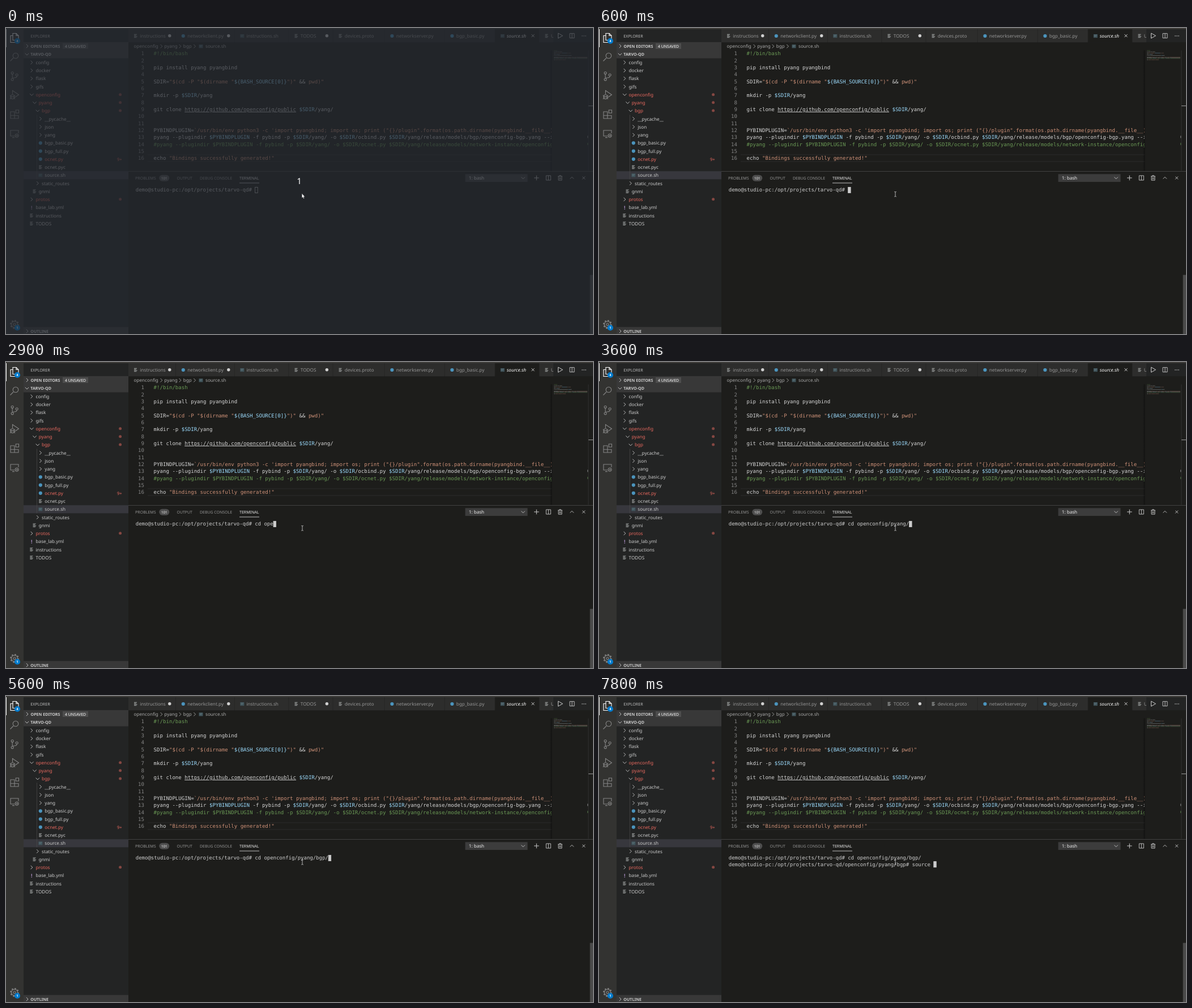
Animation, 1036 px wide and 541 px high, one loop 8000 ms. Source, as an HTML page:

```html
<!DOCTYPE html>
<html lang="en">
<head>
<meta charset="utf-8">
<title>Editor and terminal</title>
<style>
  html, body { margin: 0; width: 100%; height: 100%; overflow: hidden; background: #1d1d1b; }
  svg { display: block; width: 100%; height: 100%; }
  text { font-family: "Noto Sans", "Open Sans", sans-serif; white-space: pre; text-rendering: geometricPrecision; }
  .mono { font-family: "DejaVu Sans Mono", "Liberation Mono", monospace; font-size: 9.08px; }
  .mono tspan { text-underline-offset: 1.5px; }
  .term { letter-spacing: -0.0706px; }
</style>
</head>
<body>
<svg id="stage" viewBox="0 0 1036 541" preserveAspectRatio="none">
  <defs>
    <clipPath id="codeClip"><rect x="216" y="39" width="747" height="214"/></clipPath>
    <clipPath id="tabClip"><rect x="216" y="0" width="750" height="26"/></clipPath>
    <linearGradient id="shade">
      <stop offset="0" stop-color="#000" stop-opacity="0"/>
      <stop offset="1" stop-color="#000" stop-opacity=".4"/>
    </linearGradient>
  </defs>
</svg>
<script>
const stage = document.getElementById('stage');
const C = {
  fg: '#d4d4d4', ui: '#cccccc', dim: '#969696', red: '#e8695f', blue: '#007acc',
  str: '#ce9178', vari: '#9cdcfe', note: '#6a9955', py: '#4b94bd', bg: '#1d1d1b', side: '#232424'
};

function add(tag, attrs, parent = stage) {
  const node = document.createElementNS('http://www.w3.org/2000/svg', tag);
  for (const k in attrs) node.setAttribute(k, attrs[k]);
  parent.appendChild(node);
  return node;
}
const rect = (x, y, w, h, fill, more, parent) =>
  add('rect', { x, y, width: w, height: h, fill, ...more }, parent);
const dot = (cx, cy, r, fill, parent) => add('circle', { cx, cy, r, fill }, parent);
const line = (d, x, y, stroke, w = 0.9, parent) =>
  add('path', { d, transform: `translate(${x} ${y})`, fill: 'none', stroke, 'stroke-width': w }, parent);

// UI text, centred vertically on y
function label(x, y, str, size = 8.2, fill = C.ui, more = {}, parent) {
  const t = add('text', { x, y: y + size * 0.37, fill, 'font-size': size, ...more }, parent);
  t.textContent = str;
  return t;
}
function mono(x, y, parts, more = {}, parent) {
  const t = add('text', { x, y, class: 'mono', fill: C.fg, ...more }, parent);
  for (const [str, fill, deco] of parts) {
    const s = add('tspan', {}, t);
    if (fill) s.setAttribute('fill', fill);
    if (deco) s.setAttribute('text-decoration', deco);
    s.textContent = str;
  }
  return t;
}

const chevron = {
  right: (x, y, c = C.ui) => line('M-1.7 -3.2L1.5 0L-1.7 3.2', x, y, c),
  down: (x, y, c = C.ui) => line('M-3.2 -1.6L0 1.6L3.2 -1.6', x, y, c),
  up: (x, y, c = C.ui) => line('M-3.2 1.6L0 -1.6L3.2 1.6', x, y, c)
};
const cross = (x, y, c = C.ui) => line('M-2.5 -2.5L2.5 2.5M2.5 -2.5L-2.5 2.5', x, y, c);
const split = (x, y) => line('M-4 -4H4V4H-4ZM0 -4V4', x, y, C.ui);

const icons = {
  txt: (x, y, p) => line('M-2.8 -2.7H2.2M-2.8 -.9H1M-2.8 .9H2.8M-2.8 2.7H1.6', x, y, '#b4b7b6', 0.9, p),
  py: (x, y, p) => dot(x, y, 3.1, C.py, p),
  sh: (x, y, p) => {
    rect(x - 3.5, y - 3, 7, 6.2, '#40545b', {}, p);
    line('M-2.4 -1.2H2.4M-2.4 .6H1', x, y, '#6d8189', 0.6, p);
  },
  yml: (x, y, p) => label(x - 1.2, y, '!', 9, '#a88cc0', { 'font-weight': 700 }, p)
};

function activityBar() {
  rect(0, 0, 31, 541, '#333331');
  rect(0, 2, 1, 32, '#ffffff');
  const c = '#858585', w = 1.1;
  line('M-3 -8H3L7 -4V4H-3ZM3 -8V-4H7M-3 -4H-7V8H3V4', 15, 17.5, '#ffffff', w);
  line('M-2 2L-7.5 7.5M-2.8 -2a4.8 4.8 0 1 0 9.6 0a4.8 4.8 0 1 0 -9.6 0', 15, 51, c, w);
  line('M-5.8 -5.5a2 2 0 1 0 4 0a2 2 0 1 0 -4 0M-5.8 6a2 2 0 1 0 4 0a2 2 0 1 0 -4 0' +
       'M2.2 -2a2 2 0 1 0 4 0a2 2 0 1 0 -4 0M-3.8 -3.5V4M4.2 0Q4 3 0 3Q-3.8 3 -3.8 4', 15, 85, c, w);
  line('M-3.5 -1V-7.5L7.5 0L0 5M-6.5 3a3 3 0 0 1 6 0V4.5a3 3 0 0 1 -6 0ZM-6.5 3.6H-.5' +
       'M-8 1L-6.3 2.4M-8 4H-6.5M-8 7.5L-6.2 6M1 1L-.7 2.4M1 7.5L-.8 6', 15, 118, c, w);
  line('M-7 -4.5H0V2.3H7V7.5H-7ZM-7 2.3H0V7.5M2.3 -7.5H7.5V-2.2H2.3Z', 15, 152.5, c, w);
  line('M0 4H-7V-6H7V-1M-4 6.6H0M1.2 3.3a3 3 0 1 0 6 0a3 3 0 1 0 -6 0M3 2.3L4 3.3L3 4.3M5.6 2.3L4.7 3.3L5.6 4.3', 15, 187, c, w);
  add('circle', { cx: 15, cy: 524, r: 5.4, fill: 'none', stroke: c, 'stroke-width': 1.2 });
  add('circle', { cx: 15, cy: 524, r: 6.8, fill: 'none', stroke: c, 'stroke-width': 2, 'stroke-dasharray': '2.67 2.67' });
  add('circle', { cx: 15, cy: 524, r: 2, fill: 'none', stroke: c, 'stroke-width': 1.1 });
  for (const [y, n] of [[23, '4'], [530, '1']]) {
    dot(20, y, 5.1, C.blue);
    label(20, y, n, 5.8, '#ffffff', { 'text-anchor': 'middle', 'font-weight': 700 });
  }
}

// name, indent level, kind, marked red
const tree = [
  ['config', 0, 'right'], ['docker', 0, 'right'], ['flask', 0, 'right'], ['gifs', 0, 'right'],
  ['openconfig', 0, 'down', 1], ['pyang', 1, 'down', 1], ['bgp', 2, 'down', 1],
  ['__pycache__', 3, 'right'], ['json', 3, 'right'], ['yang', 3, 'right'],
  ['bgp_basic.py', 3, 'py'], ['bgp_full.py', 3, 'py'], ['ocnet.py', 3, 'py', 1],
  ['ocnet.pyc', 3, 'txt'], ['source.sh', 3, 'sh'], ['static_routes', 2, 'right'],
  ['gnmi', 1, 'txt'], ['protos', 0, 'right', 1], ['base_lab.yml', 0, 'yml'],
  ['instructions', 0, 'txt'], ['TODOS', 0, 'txt']
];

function sideBar() {
  const rowH = 14.245, bold = { 'font-weight': 700 };
  rect(31, 0, 185, 541, C.side);
  label(43.3, 14, 'EXPLORER', 7.12, '#bbbbbb');
  rect(31, 25, 185, 28.6, '#383838');
  chevron.right(37.5, 32);
  label(43.5, 32, 'OPEN EDITORS', 7.12, C.ui, bold);
  rect(100, 27, 45, 10, '#4d4d4d');
  label(104, 32, '4 UNSAVED', 6.95, '#ffffff');
  chevron.down(37, 46.4);
  label(43.3, 46.6, 'TARVO-QD', 7.12, C.ui, bold);

  rect(31, 253.2, 185, rowH, '#37373d');
  rect(54, 153.4, 0.7, 114, '#4b4b4b');
  tree.forEach(([name, level, kind, bad], i) => {
    const y = 46.6 + rowH * (i + 1), x = 45.3 + level * 5.25;
    if (chevron[kind]) chevron[kind](x, y);
    else icons[kind](x - 0.2, y);
    label(x + 7.2, y, name, 8.2, bad ? C.red : C.ui);
    if (!bad) return;
    if (kind === 'py') label(196, y, '9+', 7.6, C.red);
    else add('circle', { cx: 201.6, cy: y - 0.2, r: 2.5, fill: C.red, opacity: 0.5 });
  });

  rect(31, 528.6, 185, 13, '#383838');
  chevron.right(37.5, 536);
  label(43.3, 536.2, 'OUTLINE', 7.12, C.ui, bold);
}

// left edge, name, icon, unsaved
const tabs = [
  [215.8, 'instructions', 'txt', 1], [299.8, 'networkclient.py', 'py', 1],
  [403.8, 'instructions.sh', 'sh'], [499.3, 'TODOS', 'txt', 1],
  [577.3, 'devices.proto', 'txt'], [668.3, 'networkserver.py', 'py'],
  [774.3, 'bgp_basic.py', 'py'], [863.3, 'source.sh', 'sh'], [941.3, 'U', 'txt']
];

function tabBar() {
  rect(216, 0, 820, 25.3, C.side);
  const g = add('g', { 'clip-path': 'url(#tabClip)' });
  tabs.forEach(([x, name, kind, unsaved], i) => {
    const next = tabs[i + 1] ? tabs[i + 1][0] : 1000;
    const active = name === 'source.sh';
    rect(x, 2, next - x - 0.6, 23.3, active ? C.bg : '#2d2d2c', {}, g);
    icons[kind](x + 13, 14, g);
    label(x + 20.5, 14, name, 8.2, active ? '#ffffff' : C.dim, active ? { 'font-style': 'italic' } : {}, g);
    if (unsaved) dot(next - 11, 13.7, 2.7, '#d0d0d0', g);
  });
  cross(930, 13.7, '#e0e0e0');
  line('M-3.5 -4.5L4.5 0L-3.5 4.5Z', 978, 13.7, C.ui, 1);
  split(999, 13.7);
  for (const dx of [-3, 0, 3]) dot(1020 + dx, 14, 0.8, C.ui);
  rect(0, 0, 1036, 2, '#3d3c39');
}

function breadcrumbs() {
  const c = '#a9a9a9';
  for (const [x, s] of [[225.6, 'openconfig'], [279.3, 'pyang'], [312.8, 'bgp'], [352, 'source.sh']])
    label(x, 32.3, s, 8.15, c);
  for (const x of [274.3, 307.3, 333]) chevron.right(x, 32.3, c);
  icons.sh(344, 32.3);
}

const code = [
  '#!/bin/bash',
  '',
  'pip install pyang pyangbind',
  '',
  [['SDIR='], ['"$(cd -P "$(dirname "', C.str], ['${BASH_SOURCE[0]}', C.vari], ['")"', C.str], [' && '], ['pwd)"', C.str]],
  '',
  'mkdir -p $SDIR/yang',
  '',
  [['git clone '], ['https://github.com/openconfig/public', C.fg, 'underline'], [' '], ['$SDIR', C.vari], ['/yang/']],
  '',
  '',
  [['PYBINDPLUGIN='], ['`/usr/bin/env python3 -c \'import pyangbind; import os; print ("{}/plugin".format(os.path.dirname(pyangbind.__file__)))\'`', C.str]],
  'pyang --plugindir $PYBINDPLUGIN -f pybind -p $SDIR/yang/ -o $SDIR/ocbind.py $SDIR/yang/release/models/bgp/openconfig-bgp.yang --i',
  '#pyang --plugindir $PYBINDPLUGIN -f pybind -p $SDIR/yang/ -o $SDIR/ocnet.py $SDIR/yang/release/models/network-instance/openconfig',
  '',
  [['echo '], ['"Bindings successfully generated!"', C.str]]
];

function tokens(src) {
  if (Array.isArray(src)) return src;
  if (src[0] === '#') return [[src, C.note]];
  return src.split(/(\$[A-Z]+)/).map(s => [s, s[0] === '$' ? C.vari : C.fg]);
}

function editor() {
  const g = add('g', { 'clip-path': 'url(#codeClip)' });
  for (const y of [223.6, 235.6]) rect(250, y, 713, 0.8, '#303030', {}, g);
  code.forEach((src, i) => {
    const y = 48.4 + 12.33 * i;
    mono(244, y, [[String(i + 1)]], { 'text-anchor': 'end', fill: '#858585' }, g);
    const parts = tokens(src);
    mono(260.6, y, parts, {}, g);
    // minimap strokes
    let x = 967;
    for (const [str, fill] of parts) {
      for (const word of str.match(/\S+|\s+/g) || []) {
        const w = Math.min(word.length * 0.54, 1026 - x);
        if (word.trim() && w > 0)
          rect(x, 39.5 + 1.08 * i, w, 0.75, fill || C.fg, { opacity: 0.42 });
        x += word.length * 0.54;
      }
    }
  });
  rect(960, 39.5, 3.5, 213, 'url(#shade)');
  rect(1027.6, 39.5, 0.7, 213, '#3a3a3a');
  rect(1028, 137, 8, 1.2, '#8a8a8a');
  rect(1026.2, 190.5, 1, 4, '#8c8c8c');
  rect(1026.2, 203, 1, 4, '#55774a');
}

function panel() {
  rect(216, 253, 820, 0.9, '#464646');
  const y = 265, c = '#949494';
  label(228, y, 'PROBLEMS', 7.05, c);
  rect(270.3, 259.7, 18, 11.2, '#4d4d4d', { rx: 5.6 });
  label(279.3, y + 0.2, '101', 6.3, '#ffffff', { 'text-anchor': 'middle' });
  label(301.5, y, 'OUTPUT', 6.95, c);
  label(342, y, 'DEBUG CONSOLE', 6.95, c);
  label(412, y, 'TERMINAL', 7.05, '#e7e7e7');
  rect(412, 273.6, 35, 0.8, '#e7e7e7');
  rect(810.5, 258.3, 110, 13.8, '#3c3c3c');
  label(816.8, 265.3, '1: bash', 8.1, '#f0f0f0');
  chevron.down(912.6, 265.2);
  line('M-4.3 0H4.3M0 -4.3V4.3', 936.3, 265, C.ui, 1);
  split(957.3, 265);
  line('M-4 -2.8H4M-1.3 -2.8V-4.2H1.3V-2.8M-3 -2.8V4.2H3V-2.8M-1 -1V2.7M1 -1V2.7', 978, 265, C.ui);
  chevron.up(998.8, 265);
  cross(1019.6, 265);
  rect(1030.6, 436.5, 5.4, 105, '#4a4a4a');
}

rect(0, 0, 1036, 541, C.bg);
activityBar();
sideBar();
editor();
tabBar();
breadcrumbs();
panel();

// Terminal
const cell = 5.396, left = 228.8, rowTop = [281, 292.2];
const base = 'demo@studio-pc:/opt/projects/tarvo-qd';
const rows = [
  { prompt: base + '# ', input: 'cd openconfig/pyang/bgp/' },
  { prompt: base + '/openconfig/pyang/bgp# ', input: 'source ' }
];
rows.forEach((r, i) => {
  r.node = mono(left, rowTop[i] + 8.3, [], { class: 'mono term', fill: '#cccccc' });
});
const caret = rect(0, 0, cell - 0.9, 10.2, 'none', { stroke: '#cccccc', 'stroke-width': 0.8 });
const beam = line('M-1.8 -4.4Q0 -4.4 0 -3.4Q0 -4.4 1.8 -4.4M0 -3.4V3.4M-1.8 4.4Q0 4.4 0 3.4Q0 4.4 1.8 4.4', 523, 293.8, '#d8d8d8', 0.8);

// Countdown veil
const veil = add('g', {});
rect(0, 0, 1036, 541, '#24292f', { opacity: 0.7 }, veil);
label(517.6, 270.4, '1', 15, '#ffffff', { 'text-anchor': 'middle' }, veil);
add('path', {
  d: 'M522.2 292.6V300.6L523.9 299L525.1 301.7L526.4 301.1L525.2 298.5H527.6Z',
  fill: '#ffffff', stroke: '#15181c', 'stroke-width': 0.4
}, veil);

// time, row, typed characters
const steps = [
  [0, 0, 0], [2100, 0, 1], [2200, 0, 2], [2600, 0, 3], [2700, 0, 4], [2900, 0, 6],
  [3300, 0, 14], [3400, 0, 15], [3600, 0, 20], [5100, 0, 22], [5300, 0, 23], [5600, 0, 24],
  [6500, 1, 0], [7200, 1, 1], [7500, 1, 4], [7700, 1, 6], [7800, 1, 7]
];

function draw(t) {
  const [, row, typed] = steps.filter(s => s[0] <= t).pop();
  rows.forEach((r, i) => {
    const n = i < row ? r.input.length : typed;
    r.node.textContent = i > row ? '' : r.prompt + r.input.slice(0, n);
  });
  caret.setAttribute('x', left + 0.4 + (rows[row].prompt.length + typed) * cell);
  caret.setAttribute('y', rowTop[row] + 0.4);
  caret.setAttribute('fill', t < 600 ? 'none' : '#cccccc');
  veil.style.display = t < 100 ? '' : 'none';
  beam.style.display = t < 100 ? 'none' : '';
}

const start = performance.now();
function tick() {
  draw((performance.now() - start) % 8000);
  requestAnimationFrame(tick);
}
tick();
</script>
</body>
</html>
```
